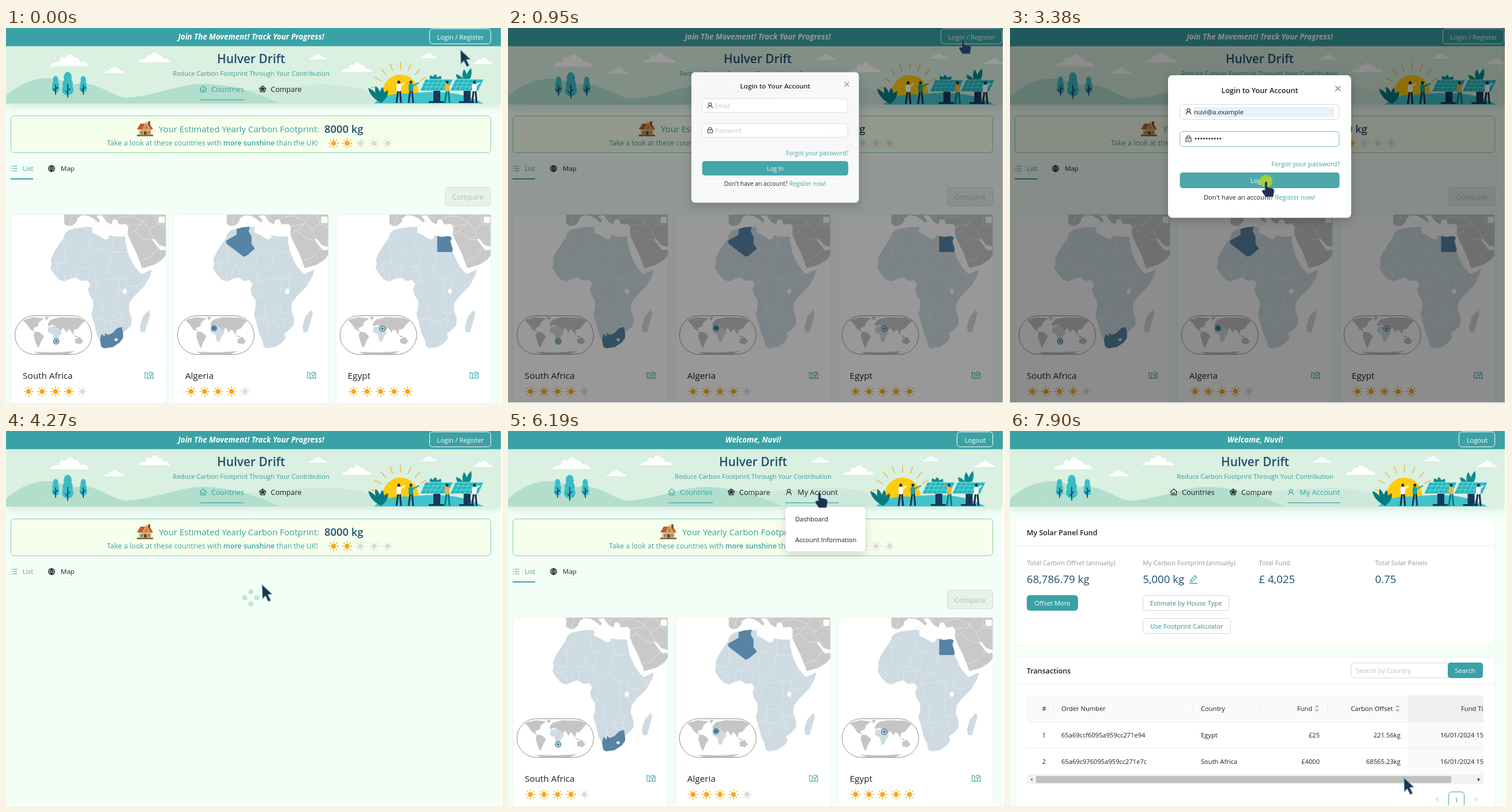
An HTML page with a canvas for the animation above (8 s loop, 860x651 px).

```html
<!DOCTYPE html>
<html lang="en">
<head>
<meta charset="utf-8">
<title>Sign in and dashboard</title>
<style>
html,body{margin:0;width:100%;height:100%;overflow:hidden;background:#fff}
canvas{display:block}
</style>
</head>
<body>
<canvas id="stage" width="860" height="651"></canvas>
<script>
const g = document.getElementById('stage').getContext('2d');
const TEAL = '#3aa2a6', NAVY = '#1f4f70', INK = '#1c2023', GREY = '#8b9a98', PAGE = '#f3fff6';

// ---- drawing helpers ----
function path(d, fill, stroke, width = 1) {
  const p = new Path2D(d);
  if (fill) { g.fillStyle = fill; g.fill(p); }
  if (stroke) { g.strokeStyle = stroke; g.lineWidth = width; g.stroke(p); }
}
function text(s, x, y, size, color = INK, weight = 400, align = 'left', style = '') {
  g.font = `${style} ${weight} ${size}px "Open Sans","Noto Sans",sans-serif`;
  g.fillStyle = color;
  g.textAlign = align;
  g.fillText(s, x, y);
  return x + g.measureText(s).width;
}
function box(x, y, w, h, r, fill, stroke) {
  g.beginPath();
  if (stroke) g.roundRect(x + .5, y + .5, w - 1, h - 1, r);
  else g.roundRect(x, y, w, h, r);
  if (fill) { g.fillStyle = fill; g.fill(); }
  if (stroke) { g.strokeStyle = stroke; g.lineWidth = 1; g.stroke(); }
}
function oval(x, y, rx, ry, fill, stroke, width = 1) {
  g.beginPath();
  g.ellipse(x, y, rx, ry, 0, 0, 7);
  if (fill) { g.fillStyle = fill; g.fill(); }
  if (stroke) { g.strokeStyle = stroke; g.lineWidth = width; g.stroke(); }
}
function rect(x, y, w, h, fill) { g.fillStyle = fill; g.fillRect(x, y, w, h); }
function clip(x, y, w, h) { g.beginPath(); g.rect(x, y, w, h); g.clip(); }
function at(x, y, draw, scale = 1) {
  g.save(); g.translate(x, y); g.scale(scale, scale); draw(); g.restore();
}
function shadow(color, blur, dy, draw) {
  g.save();
  g.shadowColor = color; g.shadowBlur = blur; g.shadowOffsetY = dy;
  draw();
  g.restore();
}
const clamp = v => Math.max(0, Math.min(1, v));
const smooth = v => v * v * (3 - 2 * v);

// ---- icons, each centred on 0,0 ----
const ICON = {
  home: 'M-6 0L0 -5.5L6 0M-4.5 -1V5H4.5V-1M-1.5 5V1H1.5V5',
  net: 'M0 -5.5L5.5 -1.4L3.4 5H-3.4L-5.5 -1.4ZM0 -2.5L2.6 -.6L1.6 2.4H-1.6L-2.6 -.6ZM0 -5.5V0L5.5 -1.4M0 0L3.4 5M0 0L-3.4 5M0 0L-5.5 -1.4',
  user: 'M2.7 -2.3A2.7 2.7 0 1 1 -2.7 -2.3A2.7 2.7 0 1 1 2.7 -2.3M-4.5 5.3Q-4 .6 0 .6T4.5 5.3',
  lock: 'M-4.5 -1H4.5V5H-4.5ZM-2.6 -1V-3Q-2.6 -5 0 -5T2.6 -3V-1M0 1V3',
  list: 'M-2.5 -4H5.5M-2.5 0H5.5M-2.5 4H5.5M-5.5 -4H-4M-5.5 0H-4M-5.5 4H-4',
  globe: 'M5.5 0A5.5 5.5 0 1 1 -5.5 0A5.5 5.5 0 1 1 5.5 0M-5.5 0H5.5M0 -5.5V5.5M-4.6 -2.8H4.6M-4.6 2.8H4.6M0 -5.5Q-5 0 0 5.5Q5 0 0 -5.5',
  map: 'M-2.5 -4L-7 -5V4.5L-2.5 5.5L2.5 4.5L7 5.5V-4L4 -5M-2.5 -4V5.5M2.5 1V4.5M2.5 1L0 -2.5A2.6 2.6 0 1 1 5 -2.5Z',
  edit: 'M-7 6.5H7M-5 3.5L-4.4 .5L3 -7L5.6 -4.4L-2 3Z',
  close: 'M-4.5 -4.5L4.5 4.5M4.5 -4.5L-4.5 4.5'
};
const icon = (name, x, y, color, width = 1.1) => at(x, y, () => path(ICON[name], null, color, width));

function sun(x, y, color) {
  oval(x, y, 4.4, 4.4, color);
  for (let i = 0; i < 8; i++) {
    const a = i * Math.PI / 4, c = Math.cos(a), s = Math.sin(a);
    path(`M${x + 6 * c} ${y + 6 * s}L${x + 8.4 * c} ${y + 8.4 * s}`, null, color, 1.7);
  }
}
function suns(x, y, count) {
  for (let i = 0; i < 5; i++) sun(x + i * 23.4, y, i < count ? '#f3aa1d' : '#d8dcd8');
}

// ---- banner scenery ----
function cloud(x, y, w) {
  at(x, y, () => path('M-1 .3Q-.8 .05 -.55 .1Q-.45 -.3 -.2 -.1Q0 -.5 .25 -.15Q.45 -.2 .55 .08Q.85 .02 1 .3Z', '#fff'), w / 2);
}
function tree(x, top, rx, ry) {
  [.45, 1, 1.5].forEach((k, i) => oval(x, top + ry * k, rx * [.7, .9, 1][i], ry * .5, '#39bcc6'));
  path(`M${x} ${top + ry}V${top + 2 * ry + 4}M${x} ${top + ry * 1.6}l4 -4M${x} ${top + ry * 1.8}l-4 -4`, null, '#183a5c', 1.6);
}
function person(x, shirt, legs, arm) {
  path(`M${x - 1} 108L${x - 4} 130M${x + 2} 108L${x + 4} 130`, null, legs, 3);
  box(x - 4, 97, 8, 13, 3, shirt);
  path(`M${x + 2} 101l${arm} -6`, null, shirt, 2.3);
  oval(x, 94, 2.5, 2.8, '#18304f');
}
function leaf(x, y, len, angle, color) {
  g.save(); g.translate(x, y); g.rotate(angle);
  path(`M0 0Q-8 ${-len * .6} 0 ${-len}Q8 ${-len * .6} 0 0`, color);
  g.restore();
}
function panel(x, y, w) {
  at(x, y, () => {
    path(`M8 0H${w}L${w - 9} 20H-1Z`, '#23b9c0', '#dff8f5', .8);
    for (let i = 1; i < 6; i++) path(`M${8 + i * (w - 8) / 6} 0L${-1 + i * (w - 8) / 6} 20`, null, '#8be0de', .8);
    path(`M5 6.5H${w - 3}M2 13H${w - 6}`, null, '#8be0de', .8);
    path(`M${w / 2 - 6} 20H${w / 2 + 6}V38H${w / 2 + 12}V41H${w / 2 - 14}V38H${w / 2 - 6}Z`, '#17385a');
  });
}
function scenery() {
  clip(0, 31, 860, 100);
  rect(0, 31, 860, 100, '#daf0e0');
  path('M380 112Q480 102 545 98Q620 98 700 131H380Z', '#cde9db');
  path('M0 118Q35 86 75 87C115 90 150 118 205 124Q270 125 340 131H0Z', '#c3e5d6');
  path('M45 131Q95 96 135 96C165 99 180 115 205 121C260 119 300 96 345 97C400 99 440 115 476 131Z', '#b2decd');
  path('M0 118Q35 86 75 87Q95 89 110 98Q70 111 45 131H0Z', '#b2decd');
  [[110, 56, 68], [188, 73, 36], [257, 51, 56], [541, 50, 32], [608, 68, 54], [733, 48, 30], [827, 57, 36]].forEach(c => cloud(...c));
  tree(86, 84, 6.5, 14); tree(107, 77, 10, 20); tree(134, 84, 6.5, 14);
  for (let i = -4; i < 5; i++) {
    const a = i * .35, s = Math.sin(a), c = Math.cos(a);
    path(`M${684 + 39 * s} ${111 - 39 * c}L${684 + 52 * s} ${111 - 52 * c}`, null, '#f5b23f', 1.5);
  }
  oval(684, 112, 31, 31, '#ffcb0c');
  path('M638 131Q660 111 700 114Q780 103 828 131Z', '#41c3cc');
  [-.7, -.3, .1, .5].forEach((a, i) => leaf(650, 130, 34 - i * 3, a, '#087b80'));
  [-.7, -.1, .3].forEach((a, i) => leaf(797, 100, 26 + i * 3, a, '#098d90'));
  [-.5, 0, .6].forEach(a => leaf(744, 98, 18, a, '#098d90'));
  panel(719, 89, 56); panel(771, 89, 57);
  person(681, '#fff', '#15304f', 8); person(702, '#17a5a8', '#17385a', 12);
  person(765, '#f4b43b', '#087b80', -7); person(812, '#fff', '#17304f', 7);
}

// ---- page header ----
function header(user, account, hover, wide) {
  const mid = wide ? 433 : 425, right = wide ? 16 : 0;
  shadow('rgba(30,90,70,.18)', 14, 3, () => rect(0, 31, 860, 100, '#daf0e0'));
  g.save();
  g.translate(0, 31);
  if (wide) g.scale(1.0188, 1.0188);
  g.translate(0, -31);
  scenery();
  g.restore();
  rect(0, 0, 860, 31.6, TEAL);
  text(user ? 'Welcome, Nuvi!' : 'Join The Movement! Track Your Progress!', mid, 20, 13.3, '#fff', 700, 'center', 'italic');
  if (user) { box(778, 1, 63, 27, 5, null, '#fff'); text('Logout', 810, 19.5, 11.3, '#fff', 400, 'center'); }
  else { box(734 + right, 1, 107, 27, 5, null, '#fff'); text('Login / Register', 788 + right, 19.5, 11.3, '#fff', 400, 'center'); }
  text('Hulver Drift', mid, 61, 20.8, NAVY, 600, 'center');
  text('Reduce Carbon Footprint Through Your Contribution', mid, 83, 11.1, '#3b9a9e', 400, 'center');
  const x = user ? 278 : 336 + right / 2;
  const main = account ? INK : TEAL;
  icon('home', x + 6, 106, main);
  text('Countries', x + 20, 111, 12.6, main);
  icon('net', x + 109, 106, INK);
  text('Compare', x + 123, 111, 12.5, INK);
  if (!account) rect(x, 124, 77, 1.2, TEAL);
  if (user) {
    icon('user', x + 209, 106, account ? TEAL : INK);
    text('My Account', x + 224, 111, 12.9, account ? TEAL : INK);
    if (account || hover) rect(x + 203, 124, 92, 1.2, TEAL);
  }
}

// ---- country list ----
const AFRICA = 'M108 351L118 348L141 345L150 346L149 355L160 360L171 367L177 366L179 360L191 362L207 362L207 370L211 389L218 405L223 414L232 425L236 427L253 419L250 430L240 448L222 466L214 477L213 490L218 505L217 516L208 525L201 530L203 538L197 546L185 554L170 556L165 553L163 543L157 530L152 510L148 497L151 485L151 473L145 464L142 454L146 445L141 438L130 439L122 433L113 435L101 440L92 437L84 428L77 417L79 409L78 401L84 388L93 374L99 366L102 357Z';
const ISLAND = 'M248 489L250 497L241 528L234 528L232 519L237 501Z';
const BORDERS = [
  'M99 366H113L119 358M100 369L136 395L150 383L144 375V362L139 353L141 345M150 383L158 381L182 394L184 389V361M184 389H211',
  'M182 394L180 410L176 418L182 428L195 436L210 433L218 418M136 395L132 408L118 412L112 420L113 436M100 374L105 408L88 409L83 404',
  'M88 409L92 420L78 418M92 420L100 424L103 440M118 412L123 418L122 434M123 418L145 414L150 412L158 381',
  'M145 414L146 425L138 436M150 412L155 428L176 418M155 428L153 440L146 445M153 440L176 436L195 436L196 450L193 470L195 495L180 482L168 485L165 470L152 465L160 450L153 440',
  'M195 450L214 470M210 433L208 452M218 420L232 430L245 437L228 448L210 448M168 485L165 505L152 506M165 505L180 508L195 495L218 492',
  'M172 506L171 530M180 508L193 521M180 508L200 506L203 495M200 506L201 519'
];
const ASIA = 'M101 324V340L108 344L115 343L122 337L124 330L132 325L143 326L152 331L160 338L163 334L156 326L166 325L175 337L183 341L185 333L192 332L196 341L208 340L212 345L211 358L217 372L226 390L233 408L236 417L257 411L271 402L277 394V385L268 386L262 379L253 367L257 366L266 377L277 380V324Z';
const ASIA_LINES = 'M192 330L215 326L236 335L246 325M212 344L236 340L236 335L248 350L256 366M211 358L222 352L236 340M222 352L240 366L253 368M234 404L250 398L264 382M248 350L262 340L277 345M262 340L258 324M115 325L110 342M168 325L180 332M145 342L156 341L154 344Z';
const WORLD = 'M29 507L47 502L66 504L57 511L55 518L47 521L50 527L42 523L36 514ZM50 527L58 528L66 535L61 544L56 556L52 548L48 534ZM67 501L75 502L70 508ZM72 514L78 506L95 502L125 503L137 508L131 514L125 522L118 524L116 533L112 525L108 523L105 529L99 520L95 526L89 520L81 515L74 518ZM120 540L128 536L134 544L129 549L120 547ZM117 533L126 536L121 537ZM47 562L85 563L120 561L108 566H58Z';
const COUNTRIES = [
  ['South Africa', 4, 87, 544, 'M163 540L166 531L171 536L172 529L176 533L184 530L193 521L201 519L203 530L203 538L197 546L185 554L170 556L165 553Z'],
  ['Algeria', 4, 79, 521, 'M118 349L128 346L141 345L139 353L144 362V375L150 383L136 395L130 397L100 374V369L118 359Z'],
  ['Egypt', 5, 89, 522, 'M184 361L193 363L203 361L209 363L208 370L206 367L211 384L210 389H184Z']
];
function card([name, stars, mx, my, shape], i) {
  g.save();
  g.translate(i * 281.8, 0);
  box(8, 323, 270, 340, 6, '#fff', '#e6f3e9');
  clip(9, 324, 268, 330);
  path(ASIA, '#c9c9c9');
  path(ASIA_LINES, null, '#efefef', .7);
  path(AFRICA, '#cedbe2');
  path(ISLAND, '#cedbe2');
  BORDERS.forEach(b => path(b, null, '#e6edf1', .7));
  oval(206, 457, 3.5, 4.5, '#fff');
  path(shape, '#5784a5');
  if (!i) oval(191, 541, 3, 2.5, '#dce6eb');
  box(15, 499, 134, 68, 34, '#fff', '#8c8c8c');
  path(WORLD, '#c5c5c5');
  path('M73 520L83 517L92 521L97 529L92 535L89 544L84 545L81 532L73 528Z', '#cedbe2');
  oval(mx, my, 4.8, 4.8, '#b9d4dc', '#3b7897', 1.3);
  oval(mx, my, i == 1 ? 3.5 : 2, i == 1 ? 3.5 : 2, '#3b7897');
  box(264, 327, 12, 12, 2, '#fff', '#e2e2e2');
  text(name, 29, 609, 15.3, INK, 500);
  icon('map', 248, 603, TEAL);
  suns(39, 631, stars);
  g.restore();
}
function house(x) {
  at(x, 175, () => {
    path('M-11 -1H11V12H-11Z', '#f6c877');
    path('M-14 1L-8 -9H8L14 1Z', '#b85c38');
    path('M-6 3L2 -13L11 3Z', '#f29a43');
    path('M5 -13H9V-6H5Z', '#79583f');
    path('M-8 4H-3V9H-8ZM4 4H9V9H4ZM0 -5H4V0H0Z', '#4f9dab');
    path('M-2 4H3V12H-2Z', '#75432f');
    path('M-14 10H14V13H-14Z', '#917044');
  });
}
function listPage(user, loaded, t) {
  box(8, 152, 833, 65, 6, '#f6ffec', '#7bd2a8');
  const dx = user ? 37 : 0;
  house(241 + dx);
  text(user ? 'Your Yearly Carbon Footprint:' : 'Your Estimated Yearly Carbon Footprint:', 265 + dx, 181, 14.95, '#3b9ea2');
  text(user ? '5000 kg' : '8000 kg', 552 - dx, 182, 18.4, NAVY, 600);
  let x = text('Take a look at these countries with ', 175, 204, 12.4, TEAL);
  x = text('more sunshine', x, 204, 12.4, TEAL, 600);
  text(' than the UK!', x, 204, 12.4, TEAL);
  suns(568, 200, 2);
  icon('list', 14, 244, TEAL); text('List', 29, 248, 11.5, TEAL);
  icon('globe', 79, 244, INK); text('Map', 95, 248, 11.5);
  rect(8, 262, 833, 1, '#e5f2e8');
  if (loaded) {
    rect(8, 261, 39, 2, TEAL);
    box(761, 276, 80, 33, 5, '#e7f1e9', '#d3dcd5');
    text('Compare', 801, 298, 12.7, '#b5beb7', 400, 'center');
    COUNTRIES.forEach(card);
  } else {
    for (let i = 0; i < 4; i++) {
      const a = i * Math.PI / 2 + (t - 4270) / 1200 * 6.28;
      oval(424.5 + 10.6 * Math.cos(a), 289.5 + 10.6 * Math.sin(a), 4.6, 4.6, '#b9e7d8');
    }
  }
}

// ---- account page ----
function button(x, y, w, label, solid) {
  box(x, y, w, 27, 5, solid ? TEAL : '#fff', solid ? TEAL : '#cfd6d4');
  text(label, x + w / 2, y + 18, 11.2, solid ? '#fff' : '#35898d', 400, 'center');
}
function dashboard() {
  box(8, 152, 833, 221, 7, '#fff', '#e9f4ec');
  box(8, 392, 833, 280, 7, '#fff', '#e9f4ec');
  rect(9, 199, 831, 1, '#efefef');
  rect(9, 438, 831, 1, '#efefef');
  text('My Solar Panel Fund', 29, 181, 12.5, INK, 600);
  [['Total Carbon Offset (annually)', '68,786.79 kg'], ['My Carbon Footprint (annually)', '5,000 kg'], ['Total Fund', '£ 4,025'], ['Total Solar Panels', '0.75']]
    .forEach(([label, value], i) => {
      text(label, 29 + i * 201.3, 233, 11.1, GREY);
      text(value, 29 + i * 201.3, 264, 18.6, NAVY);
    });
  icon('edit', 318, 258, TEAL, 1.3);
  button(29, 285, 89, 'Offset More', true);
  button(230, 285, 150, 'Estimate by House Type');
  button(230, 325, 153, 'Use Footprint Calculator');
  text('Transactions', 29, 421, 12.5, INK, 600);
  box(591, 402, 172, 27, 5, '#fff', '#d5d9d8');
  text('Search by Country', 600, 420, 11.2, '#bfc3c2');
  box(759, 402, 61, 27, 5, TEAL);
  text('Search', 789, 420, 11.3, '#fff', 400, 'center');
  rect(29, 459, 661, 46, '#fafafa');
  rect(690, 459, 131, 46, '#efefef');
  rect(690, 505, 131, 92, '#fafafa');
  g.save();
  clip(29, 459, 792, 140);
  [75, 317, 433, 550].forEach(x => rect(x, 471, 1, 21, '#ececec'));
  [505, 550, 596].forEach(y => rect(29, y, 792, 1, '#efefef'));
  const row = (y, weight, cells) => cells.forEach((s, i) =>
    text(s, [59, 89, 331, 537, 677][i], y, 11.15, INK, weight, i == 0 ? 'center' : i > 2 ? 'right' : 'left'));
  row(486, 500, ['#', 'Order Number', 'Country']);
  text('Fund', 524, 486, 11.2, INK, 500, 'right');
  text('Carbon Offset', 664, 486, 11.2, INK, 500, 'right');
  text('Fund Time', 782, 486, 11.2, INK, 500);
  [532, 672].forEach(x => path(`M${x - 4} 480l4 -5l4 5ZM${x - 4} 483l4 5l4 -5Z`, '#bfbfbf'));
  row(532, 400, ['1', '65a69ccf6095a959cc271e94', 'Egypt', '£25', '221.56kg']);
  row(578, 400, ['2', '65a69c976095a959cc271e7c', 'South Africa', '£4000', '68565.23kg']);
  text('16/01/2024 15:12', 746, 532, 11.2);
  text('16/01/2024 15:11', 746, 578, 11.2);
  g.restore();
  rect(29, 597, 792, 16, '#f1f1f1');
  rect(45, 599, 720, 12, '#c1c1c1');
  path('M39 602V608L35 605Z', '#888');
  path('M811 602V608L815 605Z', '#37316b');
  path('M743 636L738 639.5L743 643M805 636L810 639.5L805 643', null, '#b8bcbb');
  box(760, 626, 28, 28, 5, '#fff', TEAL);
  text('1', 774, 645, 11.5, TEAL, 500, 'center');
}

// ---- overlays ----
function menu(alpha) {
  if (alpha <= 0) return;
  g.save();
  g.globalAlpha = alpha;
  shadow('rgba(0,0,0,.16)', 16, 5, () => box(481, 132, 139, 77, 6, '#fff'));
  text('Dashboard', 498, 157, 11.1);
  text('Account Information', 498, 193, 11.1);
  g.restore();
}
function field(y, focused) {
  box(294, y, 277, 27, 5, '#fff', focused ? '#74bfbd' : '#d6d9d9');
}
function modal(t) {
  const k = 1 - Math.pow(1 - clamp((t - 860) / 300), 6.2);
  if (k <= 0) return;
  rect(0, 0, 860, 651, `rgba(0,0,0,${.45 * k})`);
  g.save();
  // Grows out of the point that was clicked.
  const s = .2 + .8 * k;
  g.translate(790, 20); g.scale(s, s); g.translate(-790, -20);
  g.globalAlpha = Math.min(1, k * 1.06);
  shadow('rgba(0,0,0,.2)', 16, 5, () => box(274, 82, 317.5, 247.5, 7, '#fff'));
  text('Login to Your Account', 433, 113, 12.6, INK, 600, 'center');
  icon('close', 568.5, 105, '#777', 1.2);
  field(132, t >= 1750 && t < 2300);
  field(179, t >= 2300);
  icon('user', 309.5, 145, INK); icon('lock', 309.5, 192, INK);
  if (t < 2200) text('Email', 319, 150, 11.2, '#c0c4c4');
  else { rect(319, 137, 243, 18, '#e8f0fe'); text('nuvi@a.example', 319, 150, 11.2); }
  const dots = Math.round(clamp((t - 2270) / 210) * 10);
  if (!dots) text('Password', 319, 197, 11.2, '#c0c4c4');
  for (let i = 0; i < dots; i++) oval(322 + i * 4.75, 192, 1.5, 1.5, INK);
  text('Forgot your password?', 572, 240, 11.2, TEAL, 400, 'right');
  const busy = t >= 3460, over = t > 3120;
  box(294.5, 250.7, 276.8, 27.2, 5, busy ? '#83c4c7' : over ? '#4da8aa' : TEAL);
  text('Log In', busy ? 441 : 433, 269, 11.3, '#fff', 500, 'center');
  if (busy) {
    const a = t / 1000 * 6.28;
    g.strokeStyle = '#fff'; g.lineWidth = 1.3;
    g.beginPath(); g.arc(414, 265, 5, a, a + 1.6); g.stroke();
  }
  text('Register now!', text("Don't have an account? ", 336, 298, 11.15), 298, 11.15, TEAL);
  g.restore();
}

// ---- pointer: time, x, y ----
const ROUTE = [
  [0, 788, 38], [70, 788, 38], [280, 789, 18], [1450, 789, 18], [1780, 468, 155], [2050, 468, 155],
  [2270, 440, 186], [2620, 440, 186], [3220, 444, 266], [4400, 444, 267], [4400, 585, 209], [4900, 585, 209],
  [5130, 645, 222], [5360, 698, 193], [5530, 698, 193], [5700, 742, 178], [6000, 540, 106], [6420, 540, 106],
  [6680, 508, 150], [6960, 508, 150], [7430, 766, 602], [7700, 766, 602], [7900, 683, 602], [8000, 683, 602]
];
const CLICKS = [[680, 860], [1850, 1990], [3300, 3460], [6950, 7020]];
const HANDS = [[200, 1520], [3120, 3460], [5930, 7050]];
const during = (spans, t) => spans.some(([a, b]) => t >= a && t < b);
function pointer(t) {
  const i = ROUTE.findIndex(p => p[0] > t);
  const [t0, x0, y0] = ROUTE[i - 1], [t1, x1, y1] = ROUTE[i];
  const k = smooth((t - t0) / (t1 - t0));
  at(x0 + (x1 - x0) * k, y0 + (y1 - y0) * k, () => {
    if (during(CLICKS, t)) oval(0, 0, 11, 11, 'rgba(178,212,40,.85)');
    if (during(HANDS, t)) path('M-2 2Q0 -1 2 2V10L10 12Q14 13 14 17L12 27H-1L-7 18Q-7 15 -4 15L-2 16Z', '#20304f', '#5b8fa3', .8);
    else path('M0 0L1 24L6 19L11 29L15 27L10 17L17 16Z', '#22304f', '#6da9ae', 1.1);
  });
}

function frame(now) {
  const t = now % 8000;
  const user = t >= 4400, account = t >= 7090, loading = t >= 4270 && t < 4400;
  rect(0, 0, 860, 651, PAGE);
  header(user, account, t >= 5930, t >= 890 && t < 4270);
  if (account) dashboard();
  else listPage(user, !loading, t);
  if (t < 4270) modal(t);
  if (!account) menu(clamp((t - 5980) / 150));
  pointer(t);
  rect(858, 0, 2, 651, '#fff');
  rect(0, 650, 860, 1, '#fff');
  requestAnimationFrame(frame);
}
requestAnimationFrame(frame);
</script>
</body>
</html>
```
